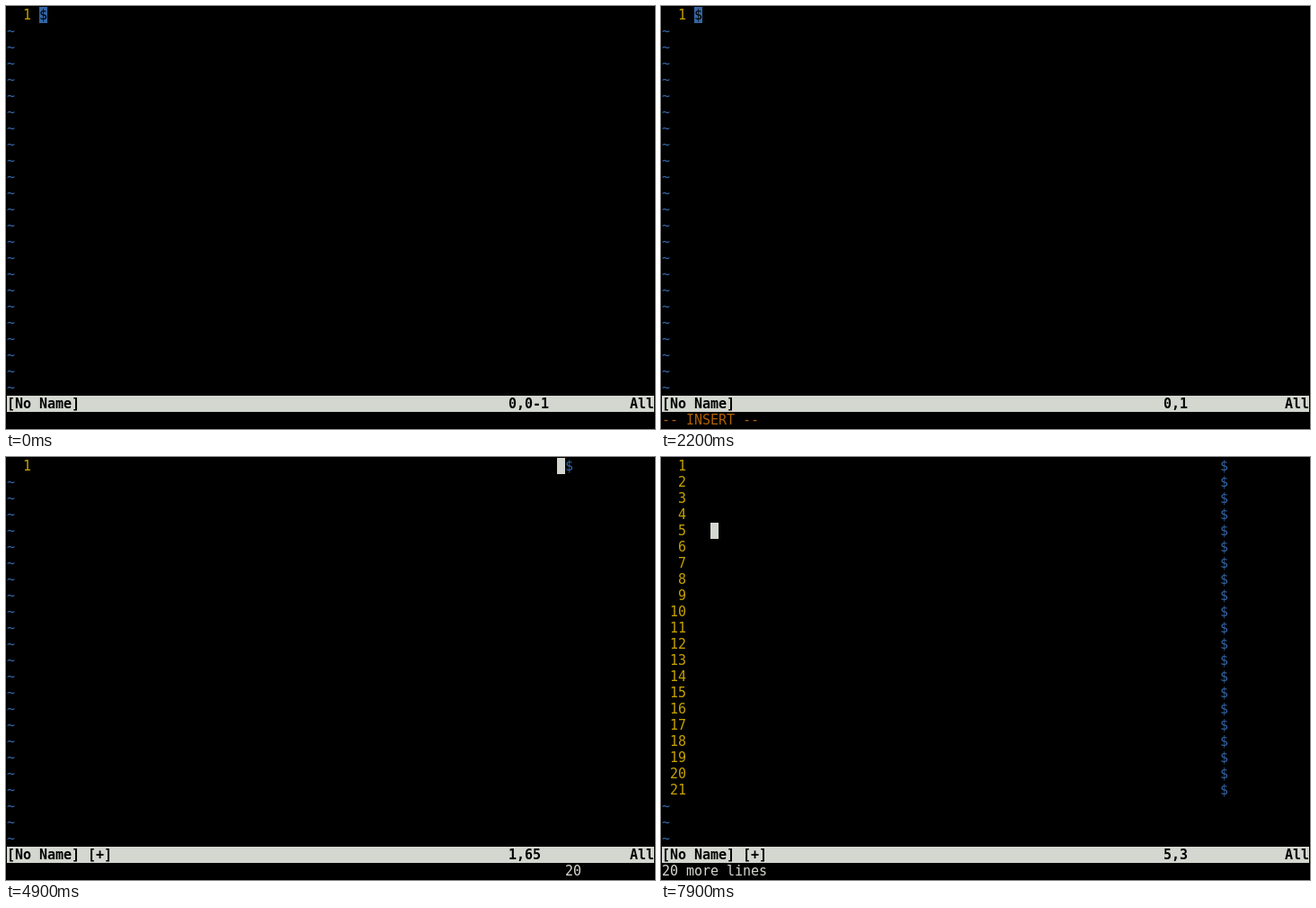
An HTML page that plays this animation: 722 by 470 pixels, repeating every 8 s.

```html
<!DOCTYPE html>
<html lang="en">
<head>
<meta charset="utf-8">
<title>Editor session</title>
<style>
  html, body { margin: 0; width: 100%; height: 100%; overflow: hidden; background: #000; }
  svg { display: block; }
  text {
    font: 15px "DejaVu Sans Mono", monospace;
    letter-spacing: -0.03px;
    white-space: pre;
  }
  .bold { font-weight: 700; }
</style>
</head>
<body>
<svg id="term" width="722" height="470" viewBox="0 0 722 470"></svg>
<script>
(() => {
  const LOOP = 8000, CELL = 9, ROW = 18, ROWS = 24, GUTTER = 4;
  const BLUE = '#3465a4', YELLOW = '#c4a000', ORANGE = '#af5f00', LIGHT = '#d3d7cf', BLACK = '#000';
  const term = document.getElementById('term');

  // Each key press changes part of the editor state.
  const initial = { lines: 1, width: 0, row: 1, col: 1, pos: '0,0-1', dirty: false, mode: '', msg: '', keys: '' };
  const presses = [
    [900, { keys: '6' }],
    [1300, { keys: '65' }],
    [1900, { keys: '', mode: '-- INSERT --', pos: '0,1' }],
    [2600, { width: 1, col: 2, pos: '', dirty: true }],
    [3300, { mode: '', width: 65, col: 65 }],
    [3700, { keys: 'y' }],
    [4000, { keys: '' }],
    [4400, { keys: '2' }],
    [4700, { keys: '20' }],
    [5500, { keys: '', lines: 21, row: 2, msg: '20 more lines' }],
    [6600, { col: 1 }],
    [7000, { col: 2 }],
    [7200, { col: 3 }],
    [7500, { row: 3 }],
    [7700, { row: 4 }],
    [7900, { row: 5 }]
  ];

  const cellX = col => 1 + col * CELL;
  const cellY = row => 1 + row * ROW;

  function block(col, row, cells, fill) {
    return `<rect x="${cellX(col)}" y="${cellY(row)}" width="${cells * CELL}" height="${ROW}" fill="${fill}"/>`;
  }

  function label(col, row, str, fill, bold) {
    const style = bold ? ' class="bold"' : '';
    return `<text x="${cellX(col)}" y="${cellY(row) + 14}" fill="${fill}"${style}>${str}</text>`;
  }

  function draw(s) {
    const cursorCol = GUTTER + s.col - 1, endCol = GUTTER + s.width;
    const onEnd = cursorCol === endCol;
    let out = block(cursorCol, s.row - 1, 1, onEnd ? BLUE : LIGHT);

    for (let r = 0; r < ROWS; r++) {
      if (r >= s.lines) {
        out += label(0, r, '~', BLUE);
        continue;
      }
      const num = String(r + 1);
      out += label(3 - num.length, r, num, YELLOW);
      out += label(endCol, r, '$', onEnd && r === s.row - 1 ? BLACK : BLUE);
    }

    out += block(0, ROWS, 80, LIGHT);
    out += label(0, ROWS, '[No Name]' + (s.dirty ? ' [+]' : ''), BLACK, true);
    out += label(62, ROWS, s.pos || `${s.row},${s.col}`, BLACK, true);
    out += label(77, ROWS, 'All', BLACK, true);

    if (s.mode) out += label(0, ROWS + 1, s.mode, ORANGE);
    if (s.msg) out += label(0, ROWS + 1, s.msg, LIGHT);
    if (s.keys) out += label(69, ROWS + 1, s.keys, LIGHT);
    term.innerHTML = out;
  }

  let shown = -1;
  function tick() {
    const t = performance.now() % LOOP;
    const done = presses.filter(p => p[0] <= t);
    if (done.length !== shown) {
      shown = done.length;
      draw(Object.assign({}, initial, ...done.map(p => p[1])));
    }
    requestAnimationFrame(tick);
  }
  tick();
})();
</script>
</body>
</html>
```
